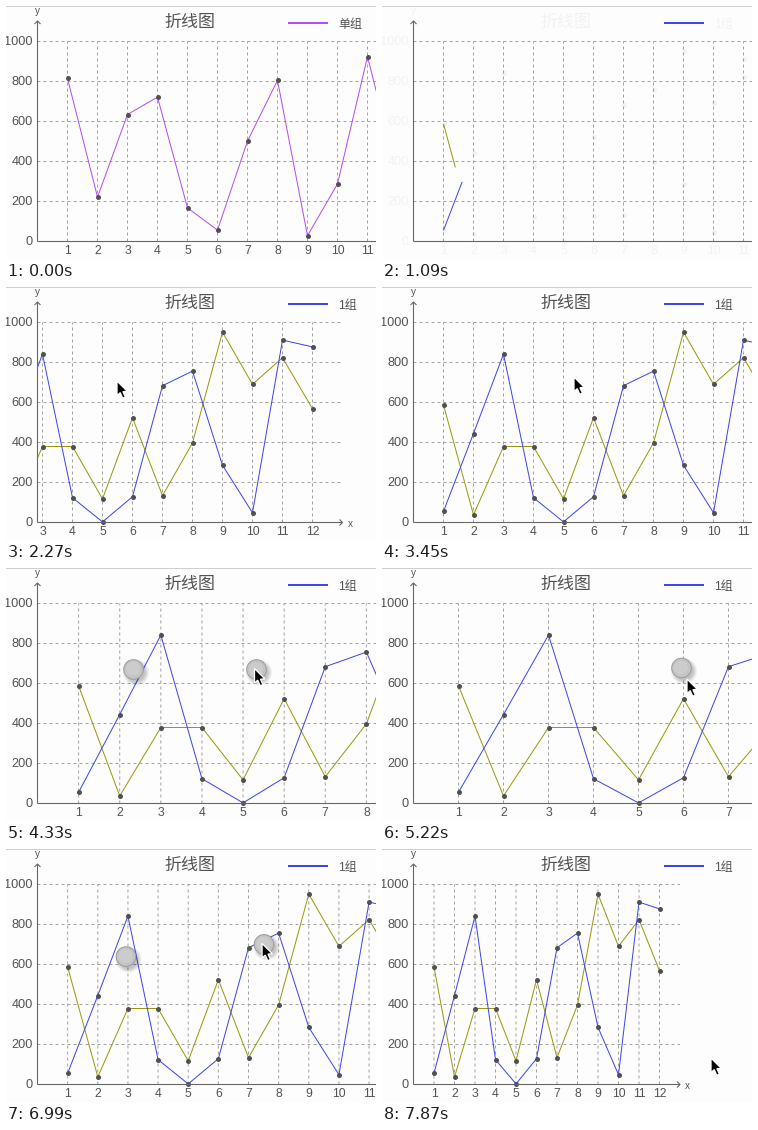
Animation of 370 by 253 pixels, one loop 8000 ms. Source, as a matplotlib script:

```python
import numpy as np
import matplotlib.pyplot as plt
from matplotlib.animation import FuncAnimation
from matplotlib.collections import LineCollection
from matplotlib.patches import Circle, Polygon, Rectangle

W, H, DPI = 370, 253, 64
PX = 72 / DPI                      # points per pixel
LOOP, TICK = 8000, 20
START, HOLD = 500, 147.3           # the picture moves in steps of HOLD ms
X0, Y0, TOP = 31.5, 235.5, 35.5    # chart origin and the height of 1000
CENTER = np.array([189, 101.5])    # pinch centre

PURPLE, BLUE, OLIVE = "#b54cf2", "#3d46ea", "#99990f"
GREY, GRID, TEXT, DOT = "#666666", "#a2a2a2", "#525252", "#505050"

# the chart's data
SINGLE = [816, 222, 635, 722, 168, 57, 502, 806, 29, 288, 924, 335]
GROUP_1 = [56, 445, 842, 124, 3, 129, 684, 757, 286, 49, 912, 878]
GROUP_2 = [588, 38, 380, 380, 118, 524, 134, 398, 952, 691, 824, 569]
N = len(SINGLE)

# key points of the pointer: step, (x, y)
KEYS = [(9, (196, 94)), (12, (111, 94)), (19, (261, 90)), (20, (192, 90)),
        (32, (305, 111)), (36, (338, 222)), (40, (290, 92)), (47, (234, 96)),
        (50, (329, 209))]
ARROW = 1.08 * np.array([(0, 0), (0, 13.5), (3, 10.8), (5.3, 16), (7.8, 14.9),
                         (5.5, 9.9), (9.6, 9.6)])

plt.rcParams["font.family"] = ["Liberation Sans", "Noto Sans CJK JP"]
plt.rcParams["path.snap"] = False
fig = plt.figure(figsize=(W / DPI, H / DPI), dpi=DPI, facecolor="#fdfdfd")
ax = fig.add_axes([0, 0, 1, 1])
ax.set(xlim=(0, W), ylim=(H, 0))
ax.axis("off")
pane = Rectangle((X0 - 0.5, 0), W, H, transform=ax.transData)


def height(values):
    return Y0 - np.asarray(values) * (Y0 - TOP) / 1000


def ease(step, start, end):
    u = np.clip((step - start) / (end - start), 0, 1)
    return u * u * (3 - 2 * u)


def label(x, y, s, size, ha="center"):
    return ax.text(x, y, s, fontsize=size * PX, ha=ha, va="center_baseline",
                   color=TEXT, zorder=5)


def stroke(color, width=1, z=2, **kw):
    line, = ax.plot([], [], color=color, lw=width * PX, zorder=z,
                    solid_capstyle="butt", **kw)
    return line


def touch():
    parts = [(Circle((0, 0), 10 + r, fc="black", alpha=0.05, lw=0, zorder=7), (2.5, 3))
             for r in range(-1, 4)]
    parts.append((Circle((0, 0), 9.8, fc="#c4c4c4", ec="#9c9c9c", lw=PX, zorder=8), (0, 0)))
    parts.append((Circle((0, 0), 7, fc="#cccccc", lw=0, zorder=8), (-0.5, -0.5)))
    for patch, _ in parts:
        ax.add_patch(patch)
    return parts


def place(parts, pos, shown):
    for patch, shift in parts:
        patch.set_visible(shown)
        patch.center = tuple(np.add(pos, shift))


def trim(xs, ys, part):
    """Return the first part of a polyline, measured by its length."""
    d = np.r_[0, np.cumsum(np.hypot(np.diff(xs), np.diff(ys)))]
    end = part * d[-1]
    keep = d < end
    return (np.r_[xs[keep], np.interp(end, d, xs)],
            np.r_[ys[keep], np.interp(end, d, ys)])


ax.plot([0, W], [0.5, 0.5], color="#cfcfcf", lw=PX)
grid = LineCollection([], colors=GRID, linewidths=PX, linestyles=(0, (3, 3)), zorder=1)
ax.add_collection(grid)
y_axis, x_axis, y_tip, x_tip = (stroke(GREY, 1.1, 4) for _ in range(4))
y_tip.set_data([X0 - 3, X0, X0 + 3], [18, 15, 18])

curves = [stroke(OLIVE), stroke(BLUE)]
dots = [stroke(DOT, z=3, ls="none", marker="o", ms=5 * PX, mew=0) for _ in curves]
for artist in [grid, *curves, *dots]:
    artist.set_clip_path(pane)

key = stroke(BLUE, 2)
key.set_data([282, 322], [17, 17])
key_text = label(332, 17, "", 12, "left")
title = label(184.5, 14.8, "折线图", 17)
y_name, x_name = label(31.5, 4.2, "y", 10), label(0, 235.5, "x", 10)
y_marks = [label(26.5, height(v) - 0.6, str(v), 12.8, "right")
           for v in range(0, 1001, 200)]
x_marks = [label(0, 243.6, str(i + 1), 12.3) for i in range(N)]
faded = [key_text, title, y_name, x_name, *y_marks, *x_marks, *dots]

touches = [touch(), touch()]
pointer = Polygon(ARROW, closed=True, fc="black", ec="white", lw=1.3 * PX, zorder=10)
ax.add_patch(pointer)


def draw_axes(gap, scroll, grow):
    left, end = X0 - scroll, X0 + (N + 1) * gap - scroll
    xs = left + gap * np.arange(1, N + 1)
    reach = left + (end - left) * grow
    rise = Y0 - (Y0 - TOP) * grow
    grid.set_segments([[(X0, y), (reach, y)] for y in height(range(200, 1001, 200))]
                      + [[(x, Y0), (x, rise)] for x in xs])
    y_axis.set_data([X0, X0], [Y0, Y0 - (Y0 - 15) * grow])
    x_axis.set_data([X0, reach], [Y0, Y0])
    x_tip.set_data([end - 3, end, end - 3], [Y0 - 3, Y0, Y0 + 3])
    for tip in (x_tip, y_tip):
        tip.set_visible(grow == 1)
    x_name.set_x(end + 7.5)
    for mark, x in zip(x_marks, xs):
        mark.set_x(x)
        mark.set_visible(x >= X0)
    return xs


def pointer_at(step):
    pos = np.array(KEYS[0][1], float)
    for (start, a), (end, b) in zip(KEYS, KEYS[1:]):
        pos += np.subtract(b, a) * ease(step, start, end)
    return pos


def draw_pointer(step):
    pos = pointer_at(step)
    pointer.set_visible(step >= KEYS[0][0])
    pointer.set_xy(ARROW + pos)
    pinch = 23 <= step <= 30 or 39 <= step <= 47
    lifted = step in (31, 32)
    finger = np.array([299.5, 100]) if lifted else pos + (2, 1)
    place(touches[0], finger, pinch or lifted)
    place(touches[1], 2 * CENTER - finger, pinch)


def draw(i):
    step = int((i * TICK + TICK / 2 - START) // HOLD)
    time = START + step * HOLD
    single = step < 0
    grow = 1 if single else np.clip((time - 450) / 590, 0, 1)
    shown = 1 if single else np.clip((time - 1046) / 750, 0, 1)

    gap = 30 + 15 * ease(step, 22, 28) - 24.5 * ease(step, 40, 47)
    scroll = 85 * (ease(step, 9, 12) - ease(step, 12, 18))
    xs = draw_axes(gap, scroll, grow)

    for curve, dot, values in zip(curves, dots, (GROUP_2, SINGLE if single else GROUP_1)):
        ys = height(values)
        curve.set_data(*trim(xs, ys, shown))
        dot.set_data(xs, ys)
    for artist in (curves[0], dots[0]):
        artist.set_visible(not single)
    for artist in (curves[1], key):
        artist.set_color(PURPLE if single else BLUE)
    key_text.set_text("单组" if single else "1组")
    for artist in faded:
        artist.set_alpha(shown)
    draw_pointer(step)
    return []


anim = FuncAnimation(fig, draw, frames=LOOP // TICK, interval=TICK,
                     repeat=True, repeat_delay=0, blit=False)
plt.show()
```
